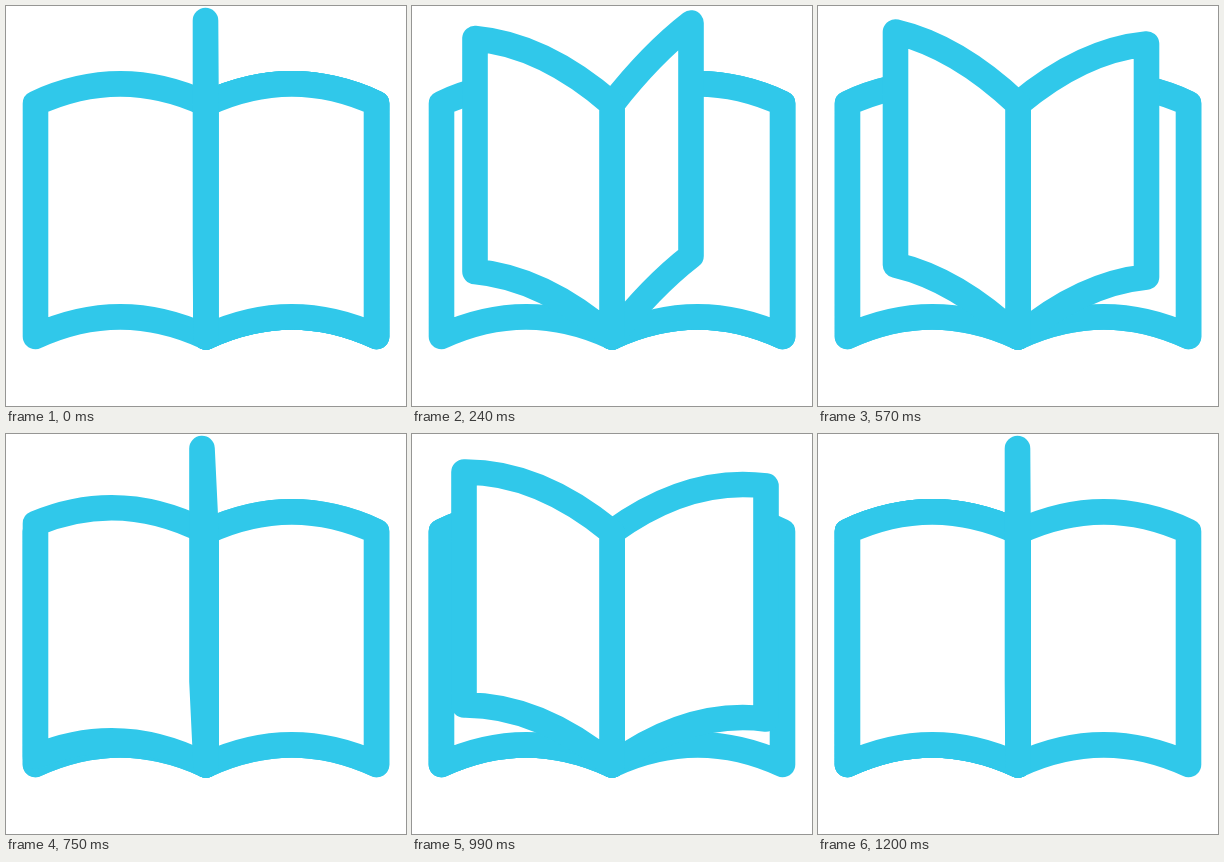
Recreate the animation shown at these times as an HTML page. Size 400 px wide and 400 px high, loop 1330 ms.

```html
<!DOCTYPE html>
<html lang="en">
<head>
<meta charset="utf-8">
<title>Turning pages</title>
<style>
  html, body { margin: 0; width: 100%; height: 100%; overflow: hidden; background: #fff; }
  svg { display: block; width: 100vw; height: 100vh; }
  path { fill: #fff; stroke: #30c8ea; stroke-width: 25.6; stroke-linejoin: round; }
</style>
</head>
<body>
<svg id="book" viewBox="0 0 400 400"></svg>
<script>
const LOOP = 1330, LAST = 1200, STEP = 30;
const SPINE = { x: 200, y: 98 }, HEIGHT = 233, WIDTH = 171;

// Times at which each page stands upright
const UPRIGHT = [0, 347, 735, 1200];

// Free top corner of a page: [ms from upright, x, y]
const TURN = [
  [-330, 370.5, 97.5], [-315, 370.5, 94.5], [-210, 354, 52], [-165, 328.5, 38],
  [-107, 279, 17], [0, 199.5, 14.5], [15, 196, 14.5], [73, 167.5, 14.5],
  [223, 77.5, 26], [240, 63, 32.5], [255, 52, 38], [403, 29.5, 89.5],
  [420, 29.5, 92], [450, 29.5, 97.5]
];

const slope = (i, k) => (TURN[i + 1][k] - TURN[i][k]) / (TURN[i + 1][0] - TURN[i][0]);

// Tangent that never overshoots its neighbours
function tangent(i, k) {
  if (i === 0 || i === TURN.length - 1) return 0;
  const a = slope(i - 1, k), b = slope(i, k);
  return a * b > 0 ? 2 * a * b / (a + b) : 0;
}

function corner(ms) {
  const end = TURN.length - 1;
  const t = Math.max(TURN[0][0], Math.min(TURN[end][0], ms));
  let i = 0;
  while (i < end - 1 && t > TURN[i + 1][0]) i++;
  const span = TURN[i + 1][0] - TURN[i][0];
  const u = (t - TURN[i][0]) / span, v = 1 - u;
  const [x, y] = [1, 2].map(k =>
    TURN[i][k] * v * v * (1 + 2 * u) + TURN[i + 1][k] * u * u * (1 + 2 * v) +
    span * u * v * (v * tangent(i, k) - u * tangent(i + 1, k)));
  return { x, y };
}

function outline({ x, y }) {
  const dx = (x - SPINE.x) / 3, dy = (y - SPINE.y) / 3;
  const bulge = 26.5 * Math.pow(Math.abs(x - SPINE.x) / WIDTH, 1.8);
  const at = (n, lift, drop) =>
    (SPINE.x + dx * n).toFixed(2) + ' ' + (SPINE.y + dy * n - lift + drop).toFixed(2);
  const p = (n, drop) => at(n, n % 3 ? bulge : 0, drop);
  return `M${p(0, 0)}C${p(1, 0)} ${p(2, 0)} ${p(3, 0)}L${p(3, HEIGHT)}` +
         `C${p(2, HEIGHT)} ${p(1, HEIGHT)} ${p(0, HEIGHT)}Z`;
}

const book = document.getElementById('book');
const paths = Array.from({ length: UPRIGHT.length + 2 }, () =>
  book.appendChild(document.createElementNS('http://www.w3.org/2000/svg', 'path')));

function draw(t) {
  const pages = UPRIGHT.map(m => corner(t - m));
  const right = pages.filter(p => p.x >= SPINE.x).reverse();
  const left = pages.filter(p => p.x < SPINE.x);
  const stack = [corner(-Infinity), corner(Infinity), ...right, ...left];
  stack.forEach((p, i) => paths[i].setAttribute('d', outline(p)));
}

const start = performance.now();
function tick() {
  const t = (performance.now() - start) % LOOP;
  draw(Math.min(LAST, Math.floor(t / STEP) * STEP));
  requestAnimationFrame(tick);
}
tick();
</script>
</body>
</html>
```
